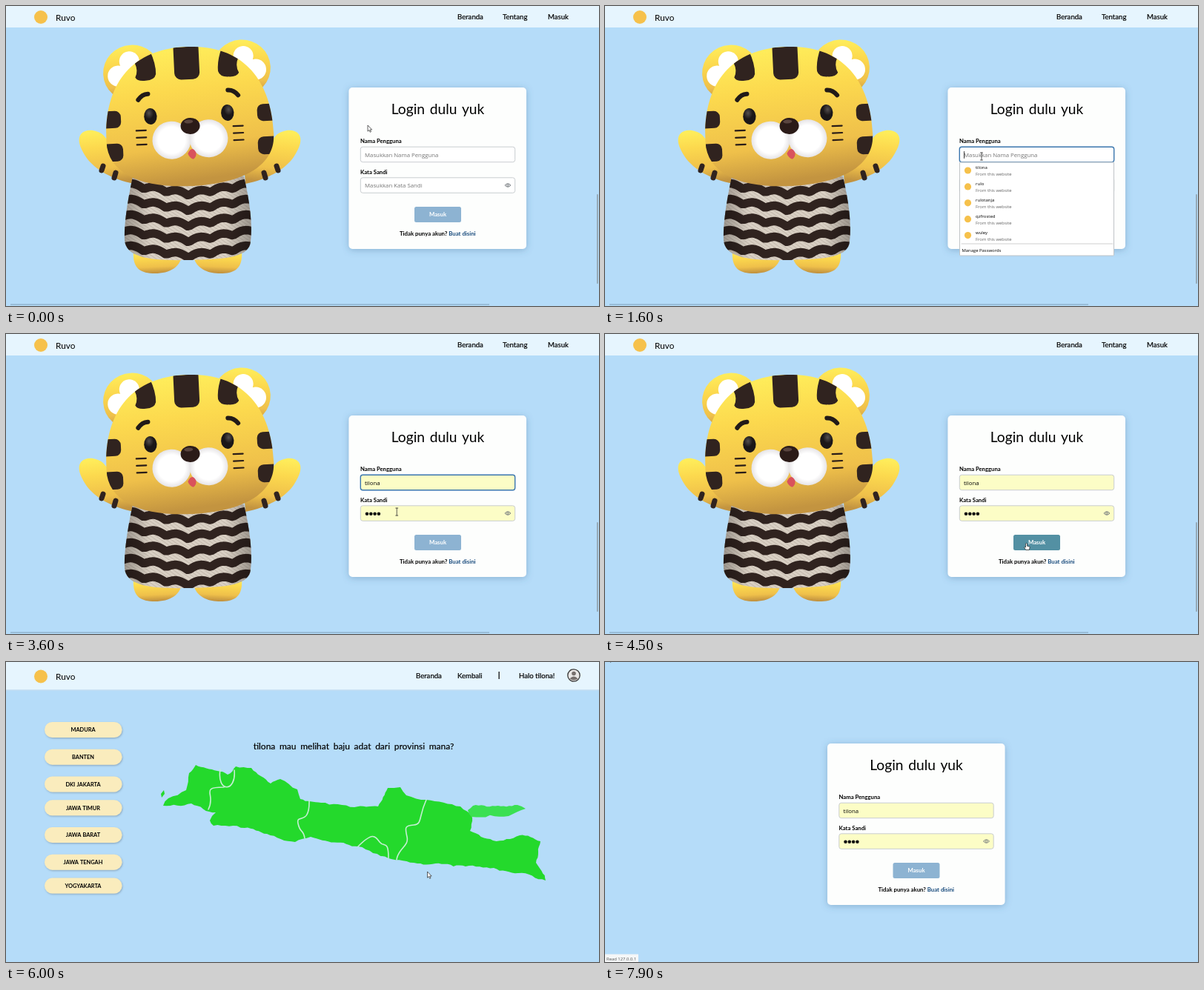
An HTML page that plays this animation: 800x405 px, repeating every 8000 ms.

```html
<!DOCTYPE html>
<html lang="id">
<head>
<meta charset="utf-8">
<title>Login</title>
<style>
  html, body { margin: 0; width: 100%; height: 100%; overflow: hidden; background: #b5dcf9; }
  svg { display: block; width: 100%; height: 100%; }
  text { font-family: "Open Sans", "Noto Sans", sans-serif; white-space: pre; }
  .hand { font-family: Lato, sans-serif; }
  .bold { font-family: Lato, sans-serif; font-weight: 700; }
</style>
</head>
<body>
<svg id="stage" viewBox="0 0 800 405" xmlns="http://www.w3.org/2000/svg"></svg>
<script>
const LOOP = 8000;
const FOCUS = 1400, PICK = 3300, BLUR = 3900, MAP = 4900, NAV = 5900, BACK = 7700;
const USER = 'tilona', BRAND = 'Ruvo';
const USERS = [USER, 'rulo', 'rulotanja', 'qzfrosted', 'wuley'];
const PROVINCES = ['MADURA', 'BANTEN', 'DKI JAKARTA', 'JAWA TIMUR', 'JAWA BARAT', 'JAWA TENGAH', 'YOGYAKARTA'];

const text = (x, y, size, str, attrs = '') => `<text x="${x}" y="${y}" font-size="${size}" ${attrs}>${str}</text>`;
const rect = (x, y, w, h, r, fill, attrs = '') =>
  `<rect x="${x}" y="${y}" width="${w}" height="${h}" rx="${r}" fill="${fill}" ${attrs}/>`;
const oval = (x, y, rx, ry, fill, attrs = '') =>
  `<ellipse cx="${x}" cy="${y}" rx="${rx}" ry="${ry}" fill="${fill}" ${attrs}/>`;
const dot = (x, y, r, fill, attrs) => oval(x, y, r, r, fill, attrs);
const path = (d, fill = 'none', attrs = '') => `<path d="${d}" fill="${fill}" ${attrs}/>`;
const line = (d, color, width) => path(d, 'none', `stroke="${color}" stroke-width="${width}" stroke-linecap="round" stroke-linejoin="round"`);
const group = (id, body, attrs = '') => `<g id="${id}" ${attrs}>${body}</g>`;
const times = (n, make) => Array.from({ length: n }, (_, i) => make(i)).join('');
const both = body => body + `<g transform="matrix(-1 0 0 1 494 0)">${body}</g>`;
const hand = 'class="hand"', bold = 'class="bold"', mid = 'text-anchor="middle"';

const defs = `<defs>
  <linearGradient id="fur" x2=".1" y2="1">
    <stop offset="0" stop-color="#fff05c"/><stop offset=".35" stop-color="#fcd94e"/>
    <stop offset=".75" stop-color="#efc04a"/><stop offset="1" stop-color="#c39440"/>
  </linearGradient>
  <radialGradient id="white"><stop offset=".7" stop-color="#fff"/><stop offset="1" stop-color="#e6e4e6"/></radialGradient>
  <radialGradient id="eye" cx=".4" cy=".3" r=".6"><stop offset="0" stop-color="#55504f"/><stop offset=".6" stop-color="#1b1718"/></radialGradient>
  <linearGradient id="shade"><stop offset="0" stop-opacity=".28"/><stop offset=".2" stop-opacity="0"/>
    <stop offset=".8" stop-opacity="0"/><stop offset="1" stop-opacity=".28"/></linearGradient>
  <pattern id="knit" width="5" height="4" patternUnits="userSpaceOnUse" patternTransform="rotate(35)">
    <rect width="5" height="4" fill="#d9d0c4"/><path d="M0 3.5H5" stroke="#bfb4a7" stroke-width=".8"/></pattern>
  <clipPath id="headClip"><use href="#head"/></clipPath>
  <clipPath id="shirtClip"><use href="#shirt"/></clipPath>
  <filter id="glow" x="-20%" y="-20%" width="140%" height="140%"><feDropShadow dx="0" dy="1.5" stdDeviation="5" flood-color="#38648c" flood-opacity=".36"/></filter>
  <filter id="drop" x="-20%" y="-30%" width="140%" height="180%"><feDropShadow dx=".8" dy="1.2" stdDeviation="1" flood-color="#4a5a68" flood-opacity=".4"/></filter>
</defs>`;

// One zigzag band: sags to a point in the middle, with small scallops on the way.
function band(i) {
  const top = 243 + i * 21;
  return 'M' + Array.from({ length: 62 }, (_, k) => {
    const x = 155 + k * 3, d = Math.abs(x - 246);
    return `${x} ${(top + 13 - d * .15 - 5 * Math.abs(Math.sin(d * Math.PI / 30))).toFixed(1)}`;
  }).join('L');
}

function tiger() {
  const dark = '#30231f';
  const arm = path('M100 173C107 165 121 167 130 174Q146 195 174 214L172 240C142 234 119 221 107 204C98 190 95 180 100 173Z', 'url(#fur)')
    + line('M130 216L128 222M147 225L145 232', dark, 7);
  const foot = path('M174 330C172 355 184 361 203 361S240 353 240 330Z', 'url(#fur)');
  const shirt = 'M171 230H321C328 260 333 292 330 318C328 340 295 342 245 343S162 340 160 316C159 292 165 258 171 230Z';
  const body = path(shirt, 'url(#knit)', 'id="shirt"')
    + `<g clip-path="url(#shirtClip)">${times(6, i => line(band(i), dark, 11.5))}</g>`
    + path(shirt, 'url(#shade)');
  const ear = oval(173, 87, 39, 38, 'url(#fur)')
    + dot(154, 90, 14, '#fff') + dot(170, 71, 13.5, '#fff') + dot(168, 86, 14, '#fff');
  const marks = rect(230, 48, 34, 51, 9, dark)
    + both(path('M177 73Q187 58 198 57Q206 76 205 90Q203 98 191 98Q180 99 177 93Q182 84 177 73Z', dark)
      + rect(124, 137, 31, 23, 8, dark) + rect(124, 181, 32, 24, 8, dark));
  const face = both(line('M179.5 123.5Q185 116 193 116', '#211a18', 6) + oval(195, 146.5, 8.7, 11, 'url(#eye)')
    + times(3, i => line(`M175 ${165 + i * 9.5}H188`, '#2a1d18', 2.2)));
  const snout = both(oval(222, 180, 26, 25.5, 'url(#white)'))
    + path('M243 199Q249 188 254 198Q255 204 250 207Q245 205 243 199Z', '#d9525c')
    + oval(248, 162, 13, 11, '#2b1b18') + oval(246, 156, 6, 2.5, '#5a4540');
  const head = path('M247 55C172 55 134 102 134 178C134 222 180 243 247 243S360 222 360 178C360 102 322 55 247 55Z', 'url(#fur)', 'id="head"');
  return `<g transform="translate(1 0)">${both(arm)}</g><g transform="translate(-2 0)">${both(foot)}</g>${body}
    <g transform="rotate(-2.75 247 150)">${both(ear)}${head}<g clip-path="url(#headClip)">${marks}</g>${face}${snout}</g>`;
}

const logo = (x, y, r) => dot(x, y, r, '#f6c14b');
const navBar = (h, y) => rect(0, 0, 800, h, 0, '#e6f5fe') + logo(47, y, 9) + text(67, y + 4.5, 11.8, BRAND, hand);
const link = (x, y, str) => text(x, y, 9.6, str, `${hand} stroke="#000" stroke-width=".2"`);

const homeNav = navBar(29, 15) + link(609, 17.5, 'Beranda') + link(670, 17.5, 'Tentang') + link(731, 17.5, 'Masuk')
  + rect(6, 402.5, 646, 1, 0, '#7f9fb8') + rect(797, 254, 1.8, 121, 1, '#93a5b2');

function loginCard() {
  const field = (id, y, label) => text(478, y - 5, 7.7, label, bold)
    + rect(478.3, y, 208.4, 20.5, 3, '#fff', `id="${id}" stroke="#c9cdd0"`);
  const eye = path('M673 242Q677 237.5 681 242Q677 246.5 673 242Z', 'none', 'stroke="#70757a" stroke-width=".9"')
    + dot(677, 242, 1.4, 'none', 'stroke="#70757a" stroke-width=".8"');
  return rect(462.5, 110, 239.5, 218, 5, '#fdfefd', 'filter="url(#glow)"')
    + text(582.5, 145.5, 19.2, 'Login dulu yuk', `${hand} ${mid} word-spacing="2"`)
    + field('name', 190.2, 'Nama Pengguna') + field('pass', 231.8, 'Kata Sandi')
    + group('hints', text(484, 203.7, 7.8, 'Masukkan Nama Pengguna') + text(484, 245.3, 7.8, 'Masukkan Kata Sandi'), 'fill="#757575"')
    + group('filled', text(484, 203.7, 7.8, USER) + times(4, i => dot(487 + i * 5.3, 242.7, 2.3, '#111')))
    + eye
    + rect(551, 271, 63, 21, 2.5, '#8db3d2', 'id="button"') + text(582.5, 284.3, 7.8, 'Masuk', `${bold} ${mid} fill="#fff"`)
    + text(582.3, 310, 7.8, 'Tidak punya akun? <tspan fill="#174a7c">Buat disini</tspan>', `${bold} ${mid}`)
    + group('caret', line('M484.5 196.5V205.5', '#111', .8));
}

function dropdown() {
  const gear = dot(675, 222, 2.7, 'none', 'stroke="#333"') + dot(675, 222, 3.5, 'none', 'stroke="#333" stroke-dasharray="1.4"')
    + dot(675, 222, 1, 'none', 'stroke="#333" stroke-width=".6"');
  const rows = USERS.map((name, i) => {
    const y = 222 + i * 21.9;
    return logo(489.5, y, 4.6) + text(500, y - 2, 6, name) + text(500, y + 7, 5.9, 'From this website', 'fill="#666"');
  }).join('');
  return rect(478.5, 211, 208, 126, 1, '#fff', 'stroke="#c0c4c7"')
    + group('row', rect(479, 211.5, 207, 22, 0, '#dadada') + gear)
    + rows + line('M481 321H685', '#cfcfcf', 1) + text(481.5, 331.5, 5.9, 'Manage Passwords');
}

let seed = 7;
const random = () => (seed = seed * 16807 % 2147483647) / 2147483647;

// Splits an edge into short pieces, pushing each midpoint sideways at random.
function roughen([x, y], [u, v]) {
  const length = Math.hypot(u - x, v - y);
  if (length < 7) return `L${u} ${v}`;
  const push = (random() - .5) * Math.min(.22, 3.5 / length);
  const m = [(x + u) / 2 - (v - y) * push, (y + v) / 2 + (u - x) * push];
  return roughen([x, y], m) + roughen(m, [u, v]);
}
function shore(points) {
  const p = points.split(' ').map(s => s.split(',').map(Number));
  return 'M' + p[0] + p.map((a, i) => roughen(a, p[(i + 1) % p.length])).join('') + 'Z';
}

function island() {
  const north = '212,202 219,192 243,181 247,158 256,147 285,155 299,160 310,149 331,151 357,172 370,166 393,180 '
    + '397,193 425,198 470,204 502,203 515,178 532,177 540,188 567,194 613,203 629,218 626,236';
  const south = '657,249 693,242 721,250 715,279 728,303 691,293 658,286 620,284 555,280 516,273 475,257 '
    + '411,244 390,251 352,240 322,232 280,229 275,222 283,211 250,199';
  const madura = '623,208 630,202 690,201 701,206 678,216 628,217';
  const borders = 'M289 153C284 185 311 184 308 154M294 177C260 177 284 186 273 207'
    + 'M409 195C410 230 391 212 394 226S401 233 403 246M475 257C495 237 498 243 504 251S516 247 516 273'
    + 'M567 194C556 218 562 227 550 228S538 231 541 244S529 259 527 275';
  const green = '#24d92c';
  return path(shore(`${north} ${south}`), green) + path('M209 186L213 181L214 186L210 191Z', green)
    + path(shore(madura), green, 'id="madura"') + line(borders, '#c4efd3', 1.6);
}

const pills = PROVINCES.map((name, i) => {
  const y = 91.5 + 36.7 * i - 4.8 * Math.floor(i / 3);
  return rect(52, y - 10.5, 104.5, 21, 10.5, '#faecbd', 'filter="url(#drop)"')
    + text(104, y + 2.8, 7.4, name, `${bold} ${mid} word-spacing=".6"`);
}).join('');

const userNav = navBar(37.5, 19.5) + rect(0, 37.5, 800, 1, 0, '#c9e0ef')
  + link(553, 21.5, 'Beranda') + link(609, 21.5, 'Kembali') + rect(664.5, 13, 1.3, 10, 0, '#111') + link(692, 21.5, `Halo ${USER}!`)
  + dot(766, 18, 8.2, '#e9e7e6', 'stroke="#3b3a3a" stroke-width="1.3"')
  + dot(766, 15.5, 2.8, '#77706e') + path('M760.5 22.5Q766 16.5 771.5 22.5Q766 26.5 760.5 22.5Z', '#77706e');

const outline = 'stroke="#222" stroke-width=".7"';
const pointers = group('arrow', path('M0 0V8.2L1.9 6.5L3.2 9.3L4.5 8.7L3.2 6H5.7Z', '#fff', outline))
  + group('beam', line('M-1.5 -5H1.5M0 -5V5M-1.5 5H1.5', '#333', .8))
  + group('finger', path('M-1 0Q0 -1.2 1 0V3.2L4 4Q5 4.5 4.5 6L3.7 8.5H-.8L-3 5Q-2.5 4 -1 5Z', '#fff', outline));

document.getElementById('stage').innerHTML = defs + rect(0, 0, 800, 405, 0, '#b5dcf9')
  + group('home', tiger() + homeNav)
  + group('card', loginCard() + group('list', dropdown()))
  + group('map', pills + group('island', island()) + group('title', text(469, 0, 12, '', `${hand} ${mid} word-spacing="2.6" stroke="#000" stroke-width=".2"`)) + group('userNav', userNav))
  + group('status', rect(0, 394.5, 137, 11, 0, '#f5f7f8', 'id="statusBox"') + text(2, 402.5, 5.9, '', 'fill="#555"'))
  + group('pointer', pointers);

const $ = id => document.getElementById(id);
const show = (id, on) => $(id).setAttribute('display', on ? 'inline' : 'none');
const set = (id, attrs) => Object.entries(attrs).forEach(([k, v]) => $(id).setAttribute(k, v));
const label = (id, str) => { $(id).querySelector('text').textContent = str; };
const between = (v, a, b) => v >= a && v < b;

const moves = [
  { from: 400, to: 1000, x: 508, y: 203 },
  { from: 2100, to: 2600, x: 508, y: 220 },
  { from: PICK, to: 4100, x: 568.5, y: 283 },
  { from: 6400, to: 7100, x: 71, y: 65 },
  { from: 7100, to: 7400, x: 4, y: -9 },
];

function pointerAt(t) {
  let x = 488, y = 161;
  for (const m of moves) {
    const u = Math.min(1, Math.max(0, (t - m.from) / (m.to - m.from))), e = u * u * (3 - 2 * u);
    x += (m.x - x) * e;
    y += (m.y - y) * e;
  }
  return [x, y];
}

function render(t) {
  const [x, y] = pointerAt(t);
  const first = t < MAP, back = t >= BACK, login = first || back, nav = t >= NAV;
  const filled = t >= PICK, open = between(t, FOCUS, PICK), focus = between(t, FOCUS, BLUR);
  const overField = first && (between(y, 190, 211) || (!open && between(y, 232, 253)));
  const overButton = first && between(x, 551, 614) && between(y, 271, 292);

  show('home', first);
  show('card', login);
  show('map', !login);
  set('card', { transform: `translate(${back ? -162.5 : 0} 0)` });
  show('list', open);
  show('row', open && y > 211);
  show('hints', !filled);
  show('filled', filled);
  show('caret', open && (t - FOCUS) % 1060 < 530);
  const tint = filled ? '#fcfdc6' : '#fff';
  set('name', { fill: tint, stroke: focus ? '#3a76ad' : '#c9cdd0', 'stroke-width': focus ? 1.4 : 1 });
  set('pass', { fill: tint });
  set('button', { fill: overButton ? '#5390a3' : '#8db3d2' });

  show('userNav', nav);
  set('island', { transform: `translate(0 ${nav ? -8 : 0})` });
  set('madura', { fill: nav ? '#3be052' : '#24d92c' });
  set('title', { transform: `translate(0 ${nav ? 117.5 : 109.5})` });
  label('title', `${nav ? USER : 'ha'} mau melihat baju adat dari provinsi mana?`);

  show('status', back || between(t, MAP, NAV));
  set('statusBox', { width: back ? 45 : 137 });
  label('status', back ? 'Read 127.0.0.1' : 'Waiting for 127.0.0.1...');

  set('pointer', { transform: `translate(${x} ${y})` });
  show('beam', overField);
  show('finger', overButton);
  show('arrow', !overField && !overButton);
}

const start = performance.now();
function tick() {
  render((performance.now() - start) % LOOP);
  requestAnimationFrame(tick);
}
tick();
</script>
</body>
</html>
```
